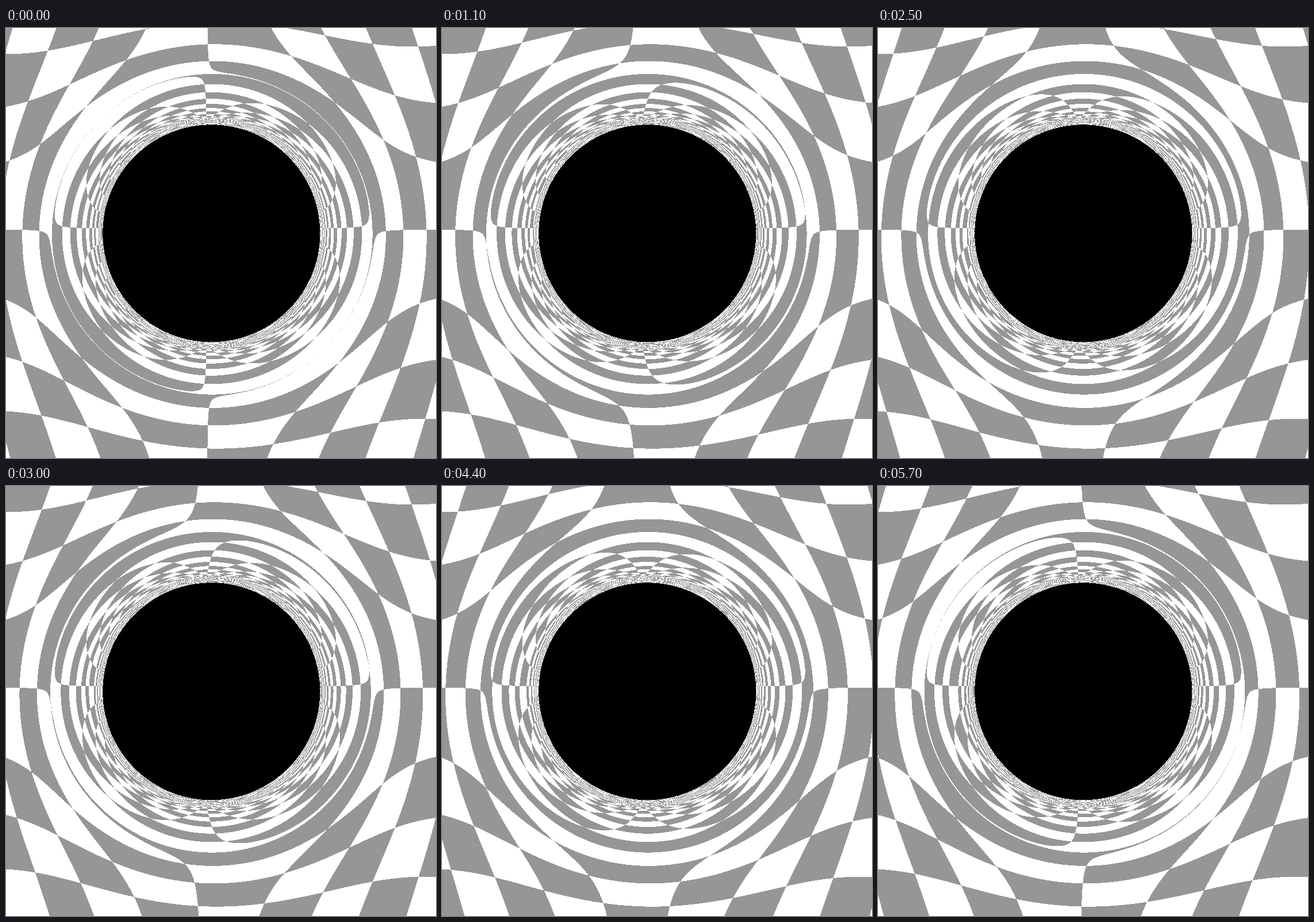
Write an HTML page with a canvas that moves like this. It is 748x748 px and loops after 5.8 s.

```html
<!DOCTYPE html>
<html lang="en">
<head>
<meta charset="utf-8">
<title>Lensed checkered sky</title>
<style>
  html, body { margin: 0; width: 100%; height: 100%; overflow: hidden; background: #fff; }
  canvas { display: block; width: 748px; height: 748px; image-rendering: pixelated; }
</style>
</head>
<body>
<canvas id="view" width="748" height="748"></canvas>
<script>
const SIZE = 748;
const STEP_MS = 100;
const STEPS = 58;
const SPIN = 0.10472;          // checker cells per step
const CELL = Math.PI / 20;     // 9 degree cells on the sky sphere
const SEAM = 10;               // meridian, in cells, where the sky's columns start
const PHASE = 0.015;
const HOLE = { c: 356.75, r: 189 };
const AXIS = 348.2;
const SKEW = 0.06;
const WHITE = 0xffffffff, GRAY = 0xff969696, BLACK = 0xff000000;

const ctx = document.getElementById('view').getContext('2d');
const image = ctx.createImageData(SIZE, SIZE);
const pixels = new Uint32Array(image.data.buffer);
const lon = new Float32Array(SIZE * SIZE);
const row = new Int8Array(SIZE * SIZE);
const HIDDEN = 100;

// Angle from the hole, in cells, at which a ray seen at radius r meets the sky
function bend(r) {
  const d = r - 303;
  return 4.5 * Math.log((r - HOLE.r) / 89.5) - 0.00135 * (d + Math.hypot(d, 25));
}

function traceSky() {
  for (let y = 0, i = 0; y < SIZE; y++) {
    for (let x = 0; x < SIZE; x++, i++) {
      const r = Math.hypot(x - HOLE.c, y - HOLE.c);
      if (r <= HOLE.r) {
        row[i] = HIDDEN;
        continue;
      }
      const dx = x - AXIS, dy = y - AXIS;
      const len = Math.hypot(dx, dy);
      const ux = dx / len, uy = dy / len;
      const angle = (bend(r) - SKEW * (ux + uy)) * CELL;
      const side = Math.sin(angle);
      lon[i] = Math.atan2(side * ux, Math.cos(angle)) / CELL - PHASE - SEAM;
      row[i] = Math.floor(Math.asin(side * uy) / CELL - PHASE);
    }
  }
}

// Columns are truncated toward the seam, so the two cells beside it share a colour
function draw(step) {
  const turn = step * SPIN;
  for (let i = 0; i < pixels.length; i++) {
    if (row[i] === HIDDEN) pixels[i] = BLACK;
    else pixels[i] = (Math.trunc(lon[i] + turn) + row[i]) & 1 ? WHITE : GRAY;
  }
  ctx.putImageData(image, 0, 0);
}

let shown = -1;
const start = performance.now();

function tick() {
  const elapsed = Math.max(0, performance.now() - start);
  const step = Math.floor(elapsed / STEP_MS) % STEPS;
  if (step !== shown) draw(shown = step);
  requestAnimationFrame(tick);
}

traceSky();
tick();
</script>
</body>
</html>
```
